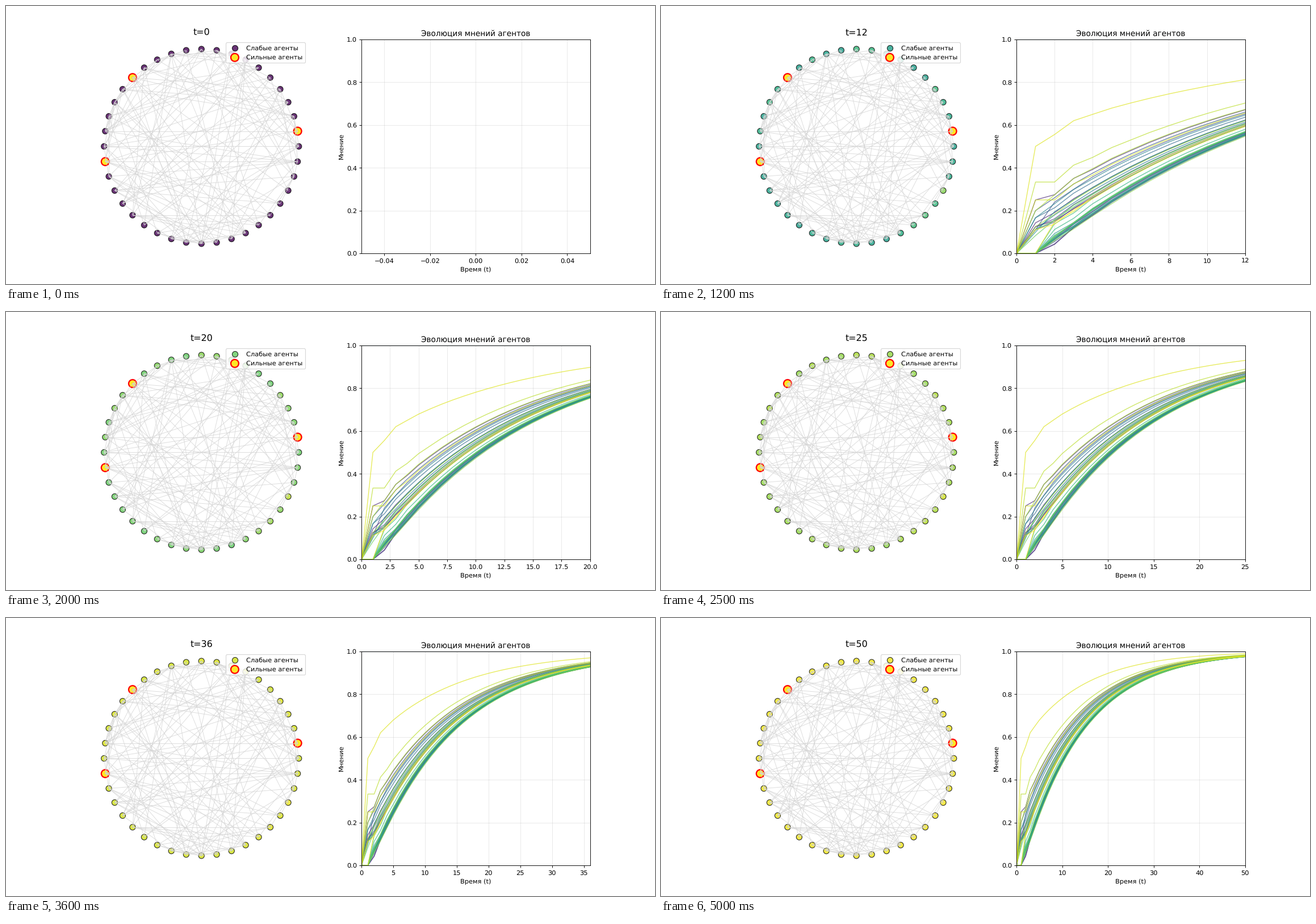
These frames come from a looping animation (1143x490 px, 5.1 s). A matplotlib script:

```python
import random
from itertools import combinations

import matplotlib.pyplot as plt
import numpy as np
from matplotlib.animation import FuncAnimation
from matplotlib.collections import LineCollection

N, STEPS, LINK_P = 40, 50, 0.2
STRONG = [1, 15, 21]
WEAK = [i for i in range(N) if i not in STRONG]
DPI = 81.65
viridis = plt.get_cmap("viridis")


def random_graph(seed):
    rng = random.Random(seed)
    return [e for e in combinations(range(N), 2) if rng.random() < LINK_P]


def simulate(edges):
    """Each weak agent takes the mean opinion of its neighbours."""
    adj = np.zeros((N, N))
    for a, b in edges:
        adj[a, b] = adj[b, a] = 1
    weights = adj / np.maximum(adj.sum(axis=1, keepdims=True), 1)
    x = np.zeros(N)
    x[STRONG] = 1
    history = [x]
    for _ in range(STEPS):
        x = weights @ x
        x[STRONG] = 1
        history.append(x)
    return np.array(history)


edges = random_graph(42)
history = simulate(edges)
angle = 2 * np.pi * np.arange(N) / N
pos = np.column_stack([np.cos(angle), np.sin(angle)])

plt.rcParams.update({"font.family": "DejaVu Sans", "text.hinting": "none"})
fig, (net, chart) = plt.subplots(
    1, 2, figsize=(1143.01 / DPI, 490.01 / DPI), dpi=DPI)

# Network
net.set(xlim=(-1.1, 1.1), ylim=(-1.1, 1.1), aspect="equal")
net.axis("off")
weak_dots = net.scatter(*pos[WEAK].T, s=80, color=[viridis(0.0)] * len(WEAK),
                        edgecolors="black", linewidths=1, alpha=0.8,
                        label="Слабые агенты")
net.scatter(*pos[STRONG].T, s=150, color=[viridis(1.0)] * len(STRONG),
            edgecolors="red", linewidths=2, label="Сильные агенты")
net.add_collection(LineCollection([pos[list(e)] for e in edges], zorder=2,
                                  colors="lightgray", linewidths=0.8,
                                  alpha=0.8), autolim=False)
legend = net.legend(loc="upper right")
title = net.set_title("t=0", fontsize=14)

# Opinion chart
chart.set_title("Эволюция мнений агентов")
chart.set_xlabel("Время (t)")
chart.set_ylabel("Мнение")
chart.set_ylim(0, 1)
chart.grid(alpha=0.3)
curves = [chart.plot([], [], color=viridis(i / (N - 1)), lw=1.2, alpha=0.7,
                     snap=False)[0]
          for i in range(N)]


def update(t):
    title.set_text(f"t={t}")
    colors = viridis(history[t, WEAK])
    weak_dots.set_facecolor(colors)
    legend.legend_handles[0].set_facecolor(colors[:1])
    for i, curve in enumerate(curves):
        curve.set_data(np.arange(t + 1), history[:t + 1, i])
    chart.set_xlim(*((0, t) if t else (-0.05, 0.05)))
    return []


anim = FuncAnimation(fig, update, frames=STEPS + 1, interval=100,
                     init_func=lambda: update(0), repeat=True)
plt.show()
```
